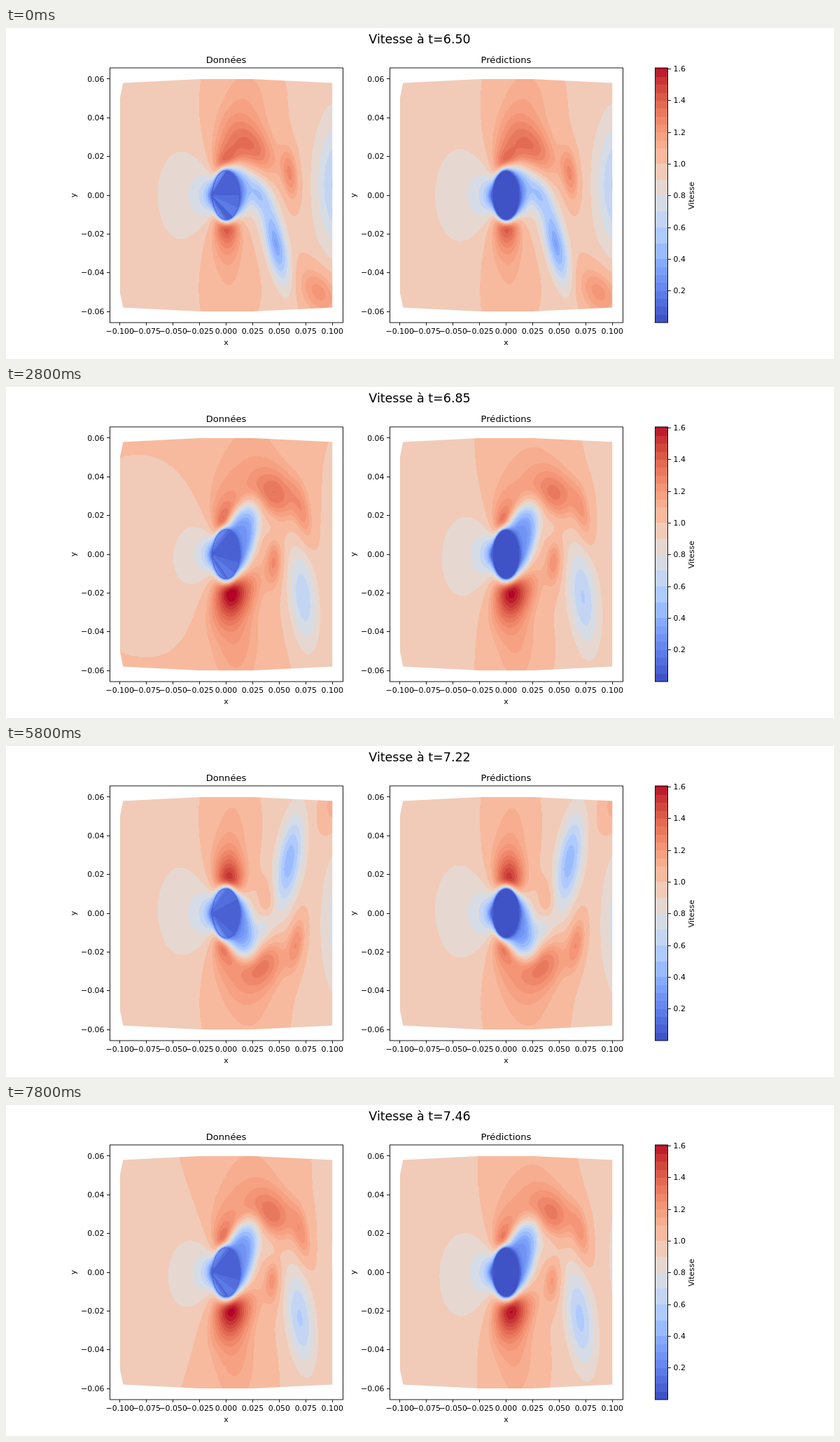
These frames come from a looping animation (1183x473 px, 8000 ms). An HTML page with a canvas:

```html
<!DOCTYPE html>
<html lang="fr">
<head>
<meta charset="utf-8">
<style>
html, body { margin: 0; width: 100%; height: 100%; overflow: hidden; background: #fff; }
canvas { display: block; }
</style>
</head>
<body>
<canvas id="stage" width="1183" height="473"></canvas>
<script>
const ctx = document.getElementById('stage').getContext('2d');
const STEP_MS = 200, STEPS = 40, CYCLES_PER_STEP = 0.159;
const CX = 314.5, CY = 239, SX = 1.5175, SY = 2.767;   // pixels per millimetre
const LEFT = 163, TOP = 72, W = 304, H = 334;
const RADIUS = 12.5, V_MAX = 1.607, TAU = 2 * Math.PI;

const frac = v => v - Math.floor(v);
const bell = v => Math.exp(-v * v);
const ease = (a, b, v) => {
  const f = Math.min(1, Math.max(0, (v - a) / (b - a)));
  return f * f * (3 - 2 * f);
};

// Diverging blue-red scale: both ends fade to grey in polar Lab space.
function colorAt(v) {
  const t = Math.min(1, Math.max(0, v / V_MAX));
  const far = Math.abs(2 * t - 1);
  const m = 88 - 8 * far, s = 1.08 * far;
  const hue = t < 0.5 ? -1.661 + 0.561 * far : 1.061 - 0.561 * far;
  const fy = (m * Math.cos(s) + 16) / 116;
  const a = m * Math.sin(s) * Math.cos(hue), b = m * Math.sin(s) * Math.sin(hue);
  const cube = f => f > 0.2069 ? f ** 3 : (f - 16 / 116) / 7.787;
  const x = 0.9505 * cube(fy + a / 500), y = cube(fy), z = 1.089 * cube(fy - b / 200);
  const gamma = c => Math.round(255 * (c > 0.0031308 ? 1.055 * c ** (1 / 2.4) - 0.055 : 12.92 * Math.max(0, c)));
  return [
    gamma(3.2406 * x - 1.5372 * y - 0.4986 * z),
    gamma(-0.9689 * x + 1.8758 * y + 0.0415 * z),
    gamma(0.0557 * x - 0.204 * y + 1.057 * z)
  ];
}

// Bands of 0.05, in pairs through the pale middle of the scale.
const BANDS = Array.from({ length: 33 }, (_, i) =>
  colorAt(i >= 8 && i < 22 ? ((i & ~1) + 1.2) / 20 : (i + 0.5) / 20));

// Each rule gives a moving lobe by its age in cycles; `out` is the distance from the axis.
const slowPocket = age => ({
  x: 47 + 112 * age,
  out: 27 * bell((age - 0.08) / 0.33),
  angle: 65 + 50 * age,
  len: 22 + 20 * age,
  wid: 9 + 18 * Math.max(0, age),
  amp: -(0.64 - 0.26 * ease(0, 0.25, age)) * ease(-0.45, -0.12, age) * (1 - ease(0.8, 1.1, age))
});

const wakeBridge = age => ({
  x: 29 + 50 * age,
  out: -2 - 60 * age,
  angle: 35,
  len: 14,
  wid: 8,
  amp: -0.4 * bell(age / 0.2)
});

const fastWedge = age => ({
  x: 33 + 55 * age,
  out: 7 - 4 * Math.sin(TAU * age) + 14 * age * age,
  angle: 90 + 30 * age,
  len: 12 + 6 * age,
  wid: 8,
  amp: 0.27 * Math.sqrt(Math.max(0, Math.sin(Math.PI * Math.min(1, age / 0.85))))
});

const fastLobe = age => ({
  x: 5 + 30 * age + 53 * age ** 3,
  out: 19 + 31 * age ** 3,
  angle: 48 * age ** 3 - 28,
  len: 14 + 9 * ease(0, 0.3, age),
  wid: 11 + 2 * age,
  amp: (0.26 + 0.09 * bell((age - 0.27) / 0.15)) * ease(-0.1, 0.24, age)
});

const wallStream = age => ({
  x: 4 + 38 * age,
  out: 42,
  angle: 0,
  len: 22 + 14 * age,
  wid: 35,
  amp: 0.16 * Math.max(0, Math.sin(Math.PI * Math.min(1, (age + 0.15) / 1.2)))
});

const RULES = [slowPocket, wakeBridge, fastWedge, fastLobe, wallStream];
const EARLIEST = -0.6, LATEST = 1.3;

// Lobes are shed from the two sides in turn, half a cycle apart.
function lobesAt(phase) {
  const lobes = [];
  for (const side of [-1, 1]) {
    const first = frac(phase + (side > 0 ? 0.5 : 0)) - 1;
    for (let age = first; age < LATEST; age++) {
      if (age < EARLIEST) continue;
      for (const rule of RULES) {
        const lobe = rule(age);
        if (Math.abs(lobe.amp) > 0.005 && (age >= 0 || rule !== fastWedge))
          lobes.push({ ...lobe, y: lobe.out * side, angle: lobe.angle * side });
      }
    }
  }
  return lobes;
}

const xAt = i => (LEFT + i + 0.5 - CX) / SX;
const yAt = j => (CY - TOP - j - 0.5) / SY;

function addLobe(field, { x, y, angle, len, wid, amp }) {
  const c = Math.cos(angle * TAU / 360), s = Math.sin(angle * TAU / 360);
  const reach = 2.5 * Math.max(len, wid);
  const i0 = Math.max(0, Math.floor((x - reach) * SX + CX - LEFT));
  const i1 = Math.min(W, Math.ceil((x + reach) * SX + CX - LEFT));
  const j0 = Math.max(0, Math.floor(CY - TOP - (y + reach) * SY));
  const j1 = Math.min(H, Math.ceil(CY - TOP - (y - reach) * SY));
  for (let j = j0; j < j1; j++) {
    const dy = yAt(j) - y;
    for (let i = i0; i < i1; i++) {
      const dx = xAt(i) - x;
      const u = (dx * c + dy * s) / len, v = (dy * c - dx * s) / wid;
      const q = u * u + v * v;
      if (q < 6.2) field[j * W + i] += amp * Math.exp(-q);
    }
  }
}

// Potential flow around the cylinder, fading downstream.
function steadyStream() {
  const field = new Float32Array(W * H);
  for (let j = 0; j < H; j++) for (let i = 0; i < W; i++) {
    const x = xAt(i), y = yAt(j), r2 = Math.max(x * x + y * y, RADIUS * RADIUS);
    const k = RADIUS * RADIUS / r2 * (x > 0 ? bell(x / 35) : 1);
    field[j * W + i] = 0.965 * Math.hypot(1 - k * (x * x - y * y) / r2, k * 2 * x * y / r2);
  }
  return field;
}

// Weight of the slow body of fluid behind the cylinder, leaning from side to side.
function nearWake(phase) {
  const lean = Math.cos(TAU * (phase - 0.2)), swing = lean * lean;
  const c = Math.cos(lean * Math.PI / 4), s = Math.sin(lean * Math.PI / 4);
  return (x, y) => {
    const dx = x - 5 - 5 * swing, dy = y - 6 * lean;
    const q = ((dx * c + dy * s) / (15 + 9 * swing)) ** 2 + ((dy * c - dx * s) / 13) ** 2;
    return Math.exp(-q * q);
  };
}

// Inside the disc: a fan of facets for the data, still for the prediction.
function discSpeed(x, y, phase, predicted) {
  if (predicted) return 0.02;
  const facet = Math.floor(Math.atan2(y, x + 14) * 4 + phase * 3);
  const rim = Math.max(0, Math.abs(y) - (x + 14) * 0.8);
  return 0.06 + 0.1 * frac(Math.sin(facet * 12.9) * 43.7) + 0.035 * rim;
}

function makePanel(predicted) {
  const canvas = document.createElement('canvas');
  canvas.width = W;
  canvas.height = H;
  const pen = canvas.getContext('2d');
  return { canvas, pen, predicted, image: pen.createImageData(W, H) };
}

const STEADY = steadyStream();

function renderPanel({ predicted, image, pen }, phase) {
  const field = STEADY.slice();
  lobesAt(phase).forEach(lobe => addLobe(field, lobe));
  const spread = predicted ? 36 : 30;
  addLobe(field, { x: -42, y: -5 * Math.sin(TAU * phase), angle: 0, len: spread, wid: spread + 2, amp: -0.05 });
  const pulse = (predicted ? 0.015 : 0.045) * Math.max(0, Math.cos(2 * TAU * (phase - 0.24))) ** 4;
  const wake = nearWake(phase);
  for (let j = 0; j < H; j++) for (let i = 0; i < W; i++) {
    const x = xAt(i), y = yAt(j), r = Math.hypot(x, y);
    let v = field[j * W + i] + pulse;
    if (r < RADIUS) v = discSpeed(x, y, phase, predicted);
    else if (r < 50) {
      const slow = wake(x, y);
      v = Math.max(0.06, (v * (1 - slow) + 0.28 * slow) * (1 - Math.exp((RADIUS - r) / 2)));
    }
    const band = BANDS[Math.min(32, Math.max(0, Math.floor(v * 20)))];
    image.data.set(band, (j * W + i) * 4);
    image.data[(j * W + i) * 4 + 3] = 255;
  }
  pen.putImageData(image, 0, 0);
}

function text(str, x, y, size = 10.95, align = 'center') {
  ctx.font = size + 'px "DejaVu Sans", sans-serif';
  ctx.textAlign = align;
  ctx.fillStyle = '#000';
  ctx.fillText(str, x, y);
}

function upright(str, x, y) {
  ctx.save();
  ctx.translate(x, y);
  ctx.rotate(-Math.PI / 2);
  text(str, 0, 0);
  ctx.restore();
}

function line(x1, y1, x2, y2) {
  ctx.beginPath();
  ctx.moveTo(x1, y1);
  ctx.lineTo(x2, y2);
  ctx.stroke();
}

const crisp = v => Math.floor(v) + 0.5;
const label = (v, digits) => v.toFixed(digits).replace('-', '\u2212');

function drawAxes(offset, title) {
  ctx.strokeStyle = '#000';
  ctx.lineWidth = 0.9;
  ctx.strokeRect(148.5 + offset, 57, 333, 364);
  for (let n = -4; n <= 4; n++) {
    const x = CX + offset + n * 25 * SX;
    line(crisp(x), 421, crisp(x), 425);
    text(label(n * 0.025, 3), x, 437);
  }
  for (let n = -3; n <= 3; n++) {
    const y = CY - n * 20 * SY;
    line(144 + offset, crisp(y), 148 + offset, crisp(y));
    text(label(n * 0.02, 2), 140.5 + offset, Math.round(y + 3.6), 10.95, 'right');
  }
  text(title, CX + offset, 50, 13.1);
  text('x', CX + offset, 453);
  upright('y', 100 + offset, 239);
}

function drawColorbar() {
  const yOf = v => 421 - v * 364 / V_MAX;
  BANDS.forEach((rgb, i) => {
    const top = Math.round(yOf(Math.min(V_MAX, (i + 1) / 20)));
    ctx.fillStyle = `rgb(${rgb})`;
    ctx.fillRect(928, top, 18, Math.round(yOf(i / 20)) - top);
  });
  ctx.strokeRect(927.5, 57, 18, 364);
  for (let n = 1; n <= 8; n++) {
    const y = yOf(n / 5);
    line(946, crisp(y), 950, crisp(y));
    text((n / 5).toFixed(1), 953.5, Math.round(y + 3.6), 10.95, 'left');
  }
  upright('Vitesse', 983, 239.5);
}

function clipToDomain(offset) {
  const upper = [[-100, 50], [-97, 58], [-25, 60], [25, 60], [100, 58]];
  const lower = upper.map(([x, y]) => [x, -y]).reverse();
  ctx.beginPath();
  for (const [x, y] of [...upper, ...lower]) ctx.lineTo(CX + offset + x * SX, CY - y * SY);
  ctx.clip();
}

const panels = [makePanel(false), makePanel(true)];
const TITLES = ['Données', 'Prédictions'];

function draw(step) {
  ctx.fillStyle = '#fff';
  ctx.fillRect(0, 0, 1183, 473);
  const phase = frac(step * CYCLES_PER_STEP);
  panels.forEach((panel, n) => {
    renderPanel(panel, phase);
    ctx.save();
    clipToDomain(n * 400);
    ctx.drawImage(panel.canvas, LEFT + n * 400, TOP);
    ctx.restore();
    drawAxes(n * 400, TITLES[n]);
  });
  drawColorbar();
  text('Vitesse à t=' + (6.5 + step * 0.02469).toFixed(2), 591, 22, 17.5);
}

let shown = -1;
const start = performance.now();
function tick() {
  const step = Math.floor((performance.now() - start) / STEP_MS) % STEPS;
  if (step !== shown) draw(shown = step);
  requestAnimationFrame(tick);
}
tick();
</script>
</body>
</html>
```
